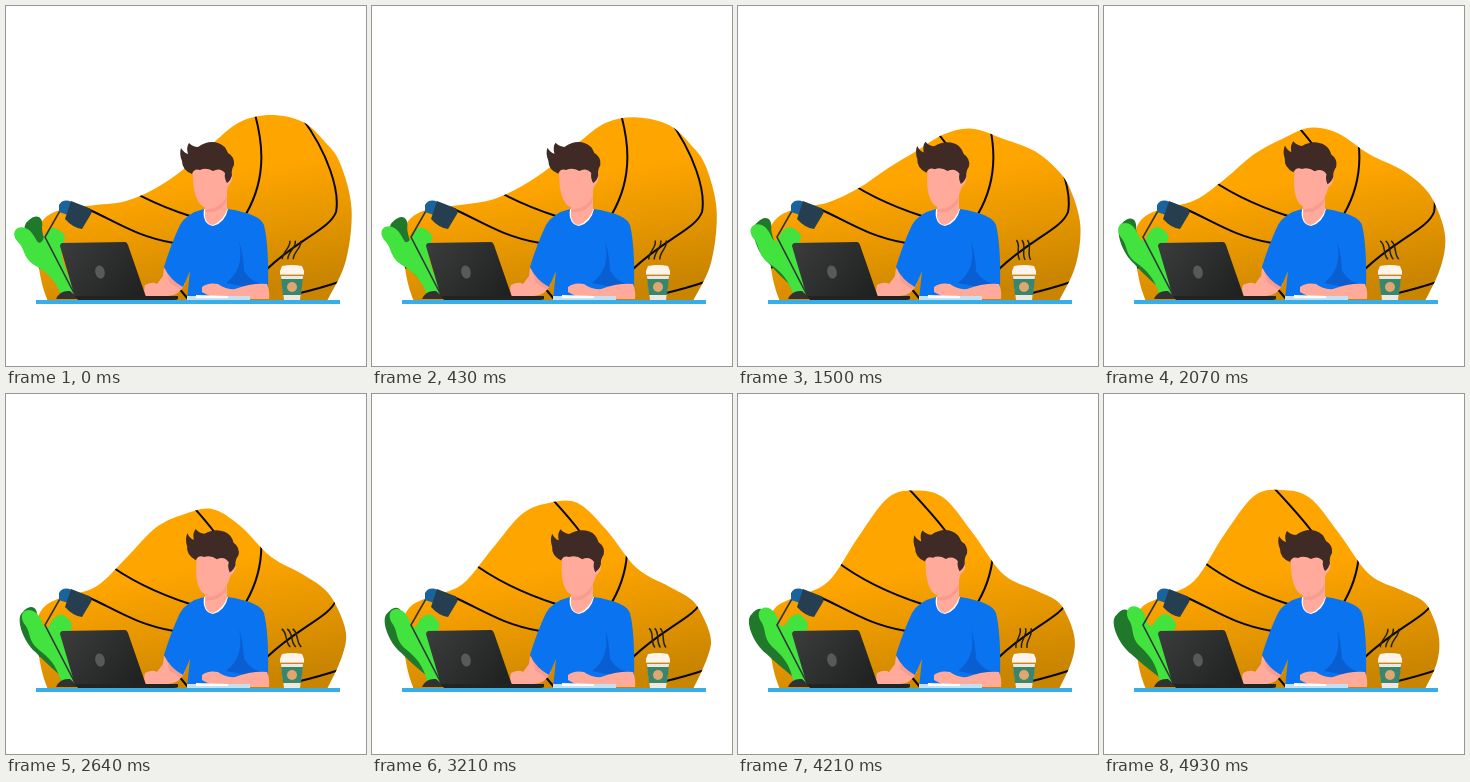
These frames come from a looping animation (360 by 360 pixels, 5 s). An HTML page with a canvas:

```html
<!DOCTYPE html>
<html lang="en">
<head>
<meta charset="utf-8">
<title>Working at a desk</title>
<style>
  html, body { margin: 0; width: 100%; height: 100%; overflow: hidden; background: #fff; }
  canvas { display: block; }
</style>
</head>
<body>
<canvas id="stage" width="360" height="360"></canvas>
<script>
const ctx = document.getElementById('stage').getContext('2d');
const LOOP = 5000;
const lerp = (a, b, t) => a + (b - a) * t;

function smoothstep(t) {
  const s = Math.min(1, t);
  return s * s * (3 - 2 * s);
}

// Upper edge of the backdrop: x, first height, last height
const CREST = [
  [90, 199, 187], [120, 195, 141], [150, 182, 102], [178, 163, 96], [206, 138, 104],
  [234, 116, 138], [265, 109, 180], [297, 116, 196], [319, 136, 207]
];

// Closed Catmull-Rom curve through the points
function closedCurve(points) {
  const path = new Path2D(), n = points.length;
  const at = i => points[(i + n) % n];
  path.moveTo(...points[0]);
  for (let i = 0; i < n; i++) {
    const [a, b, c, d] = [at(i - 1), at(i), at(i + 1), at(i + 2)];
    path.bezierCurveTo(b[0] + (c[0] - a[0]) / 6, b[1] + (c[1] - a[1]) / 6,
      c[0] - (d[0] - b[0]) / 6, c[1] - (d[1] - b[1]) / 6, ...c);
  }
  return path;
}

function fill(color, path) {
  ctx.fillStyle = color;
  ctx.fill(typeof path === 'string' ? new Path2D(path) : path);
}

function stroke(color, width, path) {
  ctx.strokeStyle = color;
  ctx.lineWidth = width;
  ctx.stroke(new Path2D(path));
}

function ellipse(color, x, y, rx, ry, angle = 0) {
  ctx.beginPath();
  ctx.ellipse(x, y, rx, ry, angle, 0, 7);
  ctx.fillStyle = color;
  ctx.fill();
}

function turned(x, y, degrees, draw) {
  ctx.save();
  ctx.translate(x, y);
  ctx.rotate(degrees * Math.PI / 180);
  ctx.translate(-x, -y);
  draw();
  ctx.restore();
}

function gradient(x0, y0, x1, y1, ...stops) {
  const g = ctx.createLinearGradient(x0, y0, x1, y1);
  stops.forEach((color, i) => g.addColorStop(i / (stops.length - 1), color));
  return g;
}

const orange = gradient(180, 110, 215, 294, '#ffa500', '#ffa500', '#e59600', '#c98400');
const screen = gradient(60, 236, 130, 292, '#3a3c3c', '#202222');

function backdrop(t) {
  // The right side settles first, the left side last
  const height = (x, from, to) => lerp(from, to, smoothstep(t / (.77 + (270 - x) * .0013)));
  const shoulder = height(333, 157, 223);
  const shape = closedCurve([
    [60, 330], [41, 293], [33, 262], [31, 230], [38, 213], [57, 203],
    ...CREST.map(([x, from, to]) => [x, height(x, from, to)]),
    [lerp(334, 329, t), shoulder],
    [lerp(345.5, 335, t), shoulder * .65 + 100],
    [lerp(340, 333, t), lerp(254, 268, t)],
    [322, 293], [300, 330]
  ]);
  ctx.save();
  ctx.beginPath();
  ctx.rect(0, 0, 360, 295);
  ctx.clip();
  fill(orange, shape);
  ctx.clip(shape);
  stroke('#080808', 2, `M246 98 C257 133 262 170 240 208
    M296 112 C322 147 334 185 330 206 C324 223 292 233 260 264
    M98 167 C123 186 150 199 184 210 M82 203 C112 217 132 231 168 237
    M170 94 C184 109 198 124 209 139 M172 281 L182 293 M290 288 Q312 283 336 275
    M30 262 Q42 261 50 255`);
  ctx.restore();
}

function plant(t) {
  turned(62, 289, -8 * t, () => fill('#20782a', `M62 288 C50 276 40 266 32 256
    C20 244 14 220 22 215 C30 207 38 210 36 222 C37 240 54 262 66 288Z`));
  turned(62, 289, 13 * t, () => fill('#42e23f', `M68 288 L55 288 C48 272 40 266 30 260
    C16 252 20 243 11 235 C3 224 14 217 23 224 C31 231 31 242 37 234
    C40 222 48 219 54 225 C63 230 57 237 56 244 C54 256 64 268 68 288Z`));
}

function lamp() {
  stroke('#303638', 1.6, 'M55 203 L39 231 L69 289');
  fill('#1b639b', 'M53 199 Q57 192 66 196 L62 209 L53 206Z');
  fill('#263f50', 'M65 195 L83 202 Q87 205 85 208 L76 223 Q67 222 59 213Z');
  fill('#303234', 'M50 293 Q54 284 64 285 L73 293Z');
}

function head() {
  fill('#ffaa9b', 'M187 164 Q186 188 194 198 Q202 206 213 198 Q220 192 222 180 Q229 174 225 164 L216 155 L194 156Z');
  fill('#402a26', `M186 168 Q176 164 176 155 Q173 148 175 142 Q178 147 182 148 Q180 141 183 137
    Q187 141 192 141 Q202 134 212 137 Q219 139 222 147 Q229 151 228 159 Q225 164 226 169
    Q225 174 221 177 Q218 172 219 167 Q214 161 207 165 Q200 161 194 164 Q188 162 186 168Z`);
}

function person(sway) {
  fill('#ffaa9b', 'M158 262 L179 278 Q173 290 162 290 L140 291 Q137 285 139 279 Q147 275 151 278 L157 270Z');
  fill('#f99b8e', 'M160 263 L179 277 L175 284 L163 276Z');
  fill('#0a73ef', `M198 203 Q181 207 174 219 Q165 238 158 261 Q164 274 177 281 L184 265 L181 294
    L240 294 L262 281 Q263 240 258 219 Q254 208 222 203Z`);
  fill('#095ed2', 'M233 235 Q239 263 220 277 L241 281 L262 280 Q246 278 238 265 Q237 246 233 235Z');
  fill('#ffffff', 'M198 203 Q196 218 207 220 Q219 217 222 203Z');
  fill('#ffaa9b', 'M199 192 L199 211 Q201 219 207 219 Q217 215 221 204 L221 183Z');
  fill('#f99b8e', 'M200 203 Q213 204 221 190 L220 197 Q212 208 200 206Z');
  turned(207, 207, 5.5 * sway, head);
  fill('#ffaa9b', `M196 281 Q202 276 212 278 Q220 284 229 283 Q245 277 261 278
    Q264 285 263 293 L215 293 Q204 291 196 286Z`);
  fill('#c5e0ef', 'M181 290 H244 V294 H181Z');
  fill('#ffffff', 'M190 289 L222 290 L222 292 L190 292Z');
}

function laptop() {
  fill(screen, 'M56 237 L119 236 Q121 236 122 239 L140 291 L69 291 L54 240 Q54 238 56 237Z');
  ellipse('#585a5a', 94, 266, 4.7, 6.7, -.25);
  fill('#222424', 'M69 290 H172 V293 Q171 294 168 294 H72Z');
}

function coffee(wave) {
  for (const x of [280, 285.5, 291]) {
    turned(x, 244, -2 + 24 * wave, () =>
      stroke('#20201f', 1.5, `M${x} 234 C${x + 4} 240 ${x - 3} 247 ${x} 254`));
  }
  fill('#eee8df', 'M275 270 H297 L294 294 H278Z');
  fill('#39866f', 'M275 273 H297 L295 289 H277Z');
  ellipse('#dfa66f', 286, 281, 5, 5);
  fill('#fff4ea', 'M276 260 Q286 258 296 260 L298 265 V269 H274 V265Z');
  stroke('#d8cabf', 1, 'M274 268.5 H298');
}

function frame(now) {
  const t = now % LOOP / LOOP;
  const wave = Math.cos(t * 2 * Math.PI);
  ctx.fillStyle = '#fff';
  ctx.fillRect(0, 0, 360, 360);
  backdrop(t);
  plant(t);
  lamp();
  person((1 - wave) / 2);
  laptop();
  coffee(wave);
  ctx.fillStyle = '#37aeea';
  ctx.fillRect(30, 294, 304, 4);
  requestAnimationFrame(frame);
}
requestAnimationFrame(frame);
</script>
</body>
</html>
```
